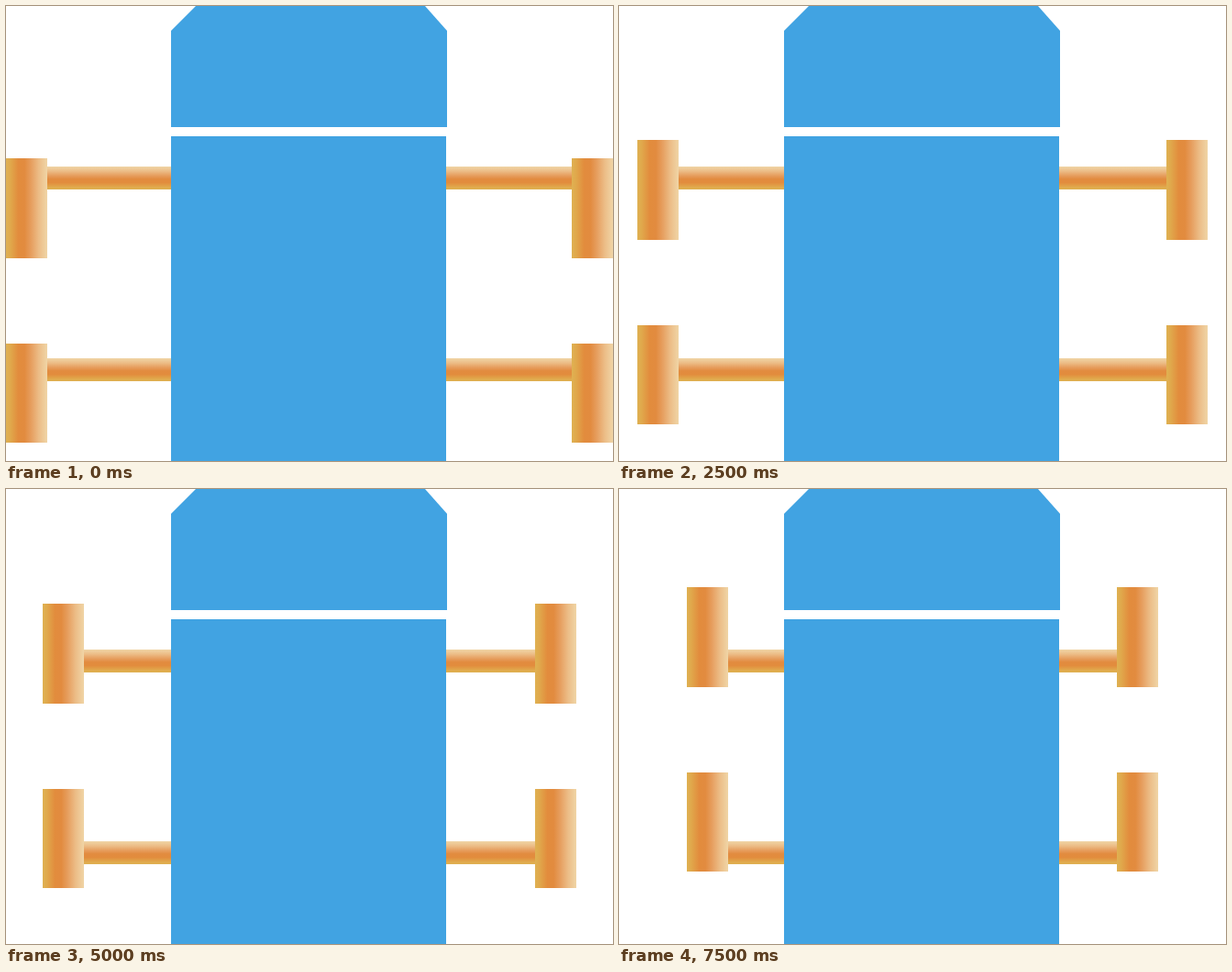
Recreate the animation shown at these times as an HTML page with a canvas. Size 662x496 px, loop 8 s.

```html
<!DOCTYPE html>
<html>
<head>
<meta charset="utf-8">
<style>
  html, body { margin: 0; height: 100%; overflow: hidden; background: #fff; }
  canvas { display: block; }
</style>
</head>
<body>
<canvas id="stage" width="662" height="496"></canvas>
<script>
const ctx = document.getElementById('stage').getContext('2d');
const STEP = 500, STEPS = 16;
const BLUE = '#41a3e2';
const METAL = [
  [0, '#dfb152'], [0.1, '#e0a94c'], [0.3, '#e28c3d'], [0.45, '#e28b3f'],
  [0.6, '#e69d5d'], [0.8, '#ecbd87'], [1, '#f0d5a6']
];

function metal(x0, y0, x1, y1) {
  const g = ctx.createLinearGradient(x0, y0, x1, y1);
  for (const [at, color] of METAL) g.addColorStop(at, color);
  return g;
}

function wheel(x, y, h) {
  ctx.fillStyle = metal(x, 0, x + 45, 0);
  ctx.fillRect(x, y, 45, h);
}

function axle(x0, x1, y) {
  ctx.fillStyle = metal(0, y + 25, 0, y);
  ctx.fillRect(x0, y, x1 - x0, 25);
}

// The wheels move in whole-pixel steps, faster inwards near the end
function wheelX(k) {
  return k <= 12 ? 4 * k : k === 13 ? 54 : 64 + 10 * (k - 14);
}

function wheelY(k) {
  return 166 - 4 * Math.min(k, 14) - (k >= 6 ? 1 : 0) - (k >= 12 ? 2 : 0);
}

function body() {
  ctx.fillStyle = BLUE;
  ctx.beginPath();
  const points = [[180, 27], [207, 0], [457, 0], [481, 27], [481, 132], [180, 132]];
  for (const [x, y] of points) ctx.lineTo(x, y);
  ctx.fill();
  ctx.fillRect(180, 142, 300, 354);
}

function draw(k) {
  const x = wheelX(k), right = 617 - x, y = wheelY(k);
  ctx.clearRect(0, 0, 662, 496);
  for (const axleY of [175, 384]) {
    axle(x + 45, 180, axleY);
    axle(480, right, axleY);
  }
  for (const left of [x, right]) {
    wheel(left, y, 109);
    wheel(left, y + 202, 108);
  }
  body();
}

const start = performance.now();
function tick() {
  const t = performance.now() - start;
  draw(Math.floor(t / STEP) % STEPS);
  requestAnimationFrame(tick);
}
tick();
</script>
</body>
</html>
```
